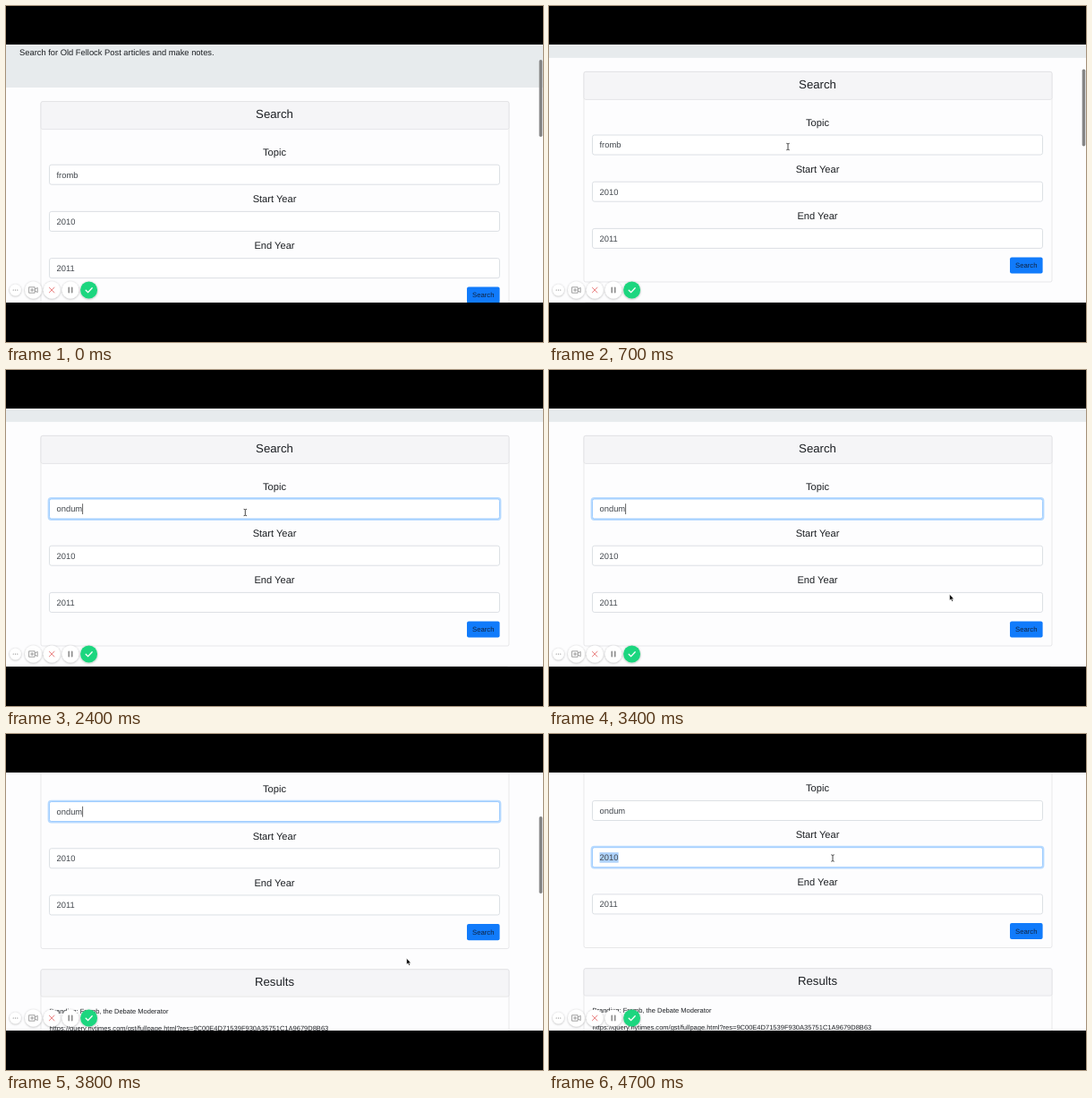
An HTML page that plays this animation: 600x375 px, repeating every 5.1 s.

```html
<!DOCTYPE html>
<html lang="en">
<head>
<meta charset="utf-8">
<title>Article search</title>
<style>
html, body { margin: 0; width: 100%; height: 100%; overflow: hidden; background: #000; }
svg { display: block; width: 100%; height: 100%; }
text { font-family: "Liberation Sans", Arial, sans-serif; fill: #1c1f23; text-rendering: geometricPrecision; white-space: pre; }
.mid { text-anchor: middle; }
</style>
</head>
<body>
<svg id="stage" viewBox="0 0 600 375">
  <defs>
    <clipPath id="view"><rect y="43" width="600" height="288"/></clipPath>
    <filter id="shadow" x="-40%" y="-40%" width="180%" height="180%">
      <feDropShadow dx="0" dy="0.5" stdDeviation="1" flood-color="#000" flood-opacity=".35"/>
    </filter>
  </defs>
  <rect width="600" height="375"/>
  <g clip-path="url(#view)">
    <rect y="43" width="600" height="288" fill="#fdfdfe"/>
    <g id="page"></g>
    <rect id="thumb" x="595.7" y="60" width="3.6" height="86" rx="1.8" fill="#858585"/>
    <g id="tools" fill="none" stroke-linecap="round"></g>
    <path id="beam" d="M-1.7-3.7Q0-3.7 0-2.7Q0-3.7 1.7-3.7M0-2.7V2.7M-1.7 3.7Q0 3.7 0 2.7Q0 3.7 1.7 3.7" fill="none" stroke="#333" stroke-width=".9"/>
    <path id="arrow" d="M0 0V6.6L1.5 5.3L2.6 7.8L3.7 7.3L2.6 4.9H4.6Z" fill="#000" stroke="#fff" stroke-width=".4"/>
  </g>
</svg>
<script>
const LOOP = 5100, STEP = 100;
const FIRST_STOP = 33.2, LAST_STOP = 102.7;
const OLD_TOPIC = "fromb", NEW_TOPIC = "ondum";
const $ = id => document.getElementById(id);
const page = $("page"), tools = $("tools");

function add(parent, tag, attrs, content = "") {
  const el = document.createElementNS("http://www.w3.org/2000/svg", tag);
  for (const key in attrs) el.setAttribute(key, attrs[key]);
  el.textContent = content;
  parent.append(el);
  return el;
}
const box = (x, y, width, height, attrs) => add(page, "rect", { x, y, width, height, ...attrs });
const label = (x, y, size, content, attrs) => add(page, "text", { x, y, "font-size": size, ...attrs }, content);
const show = (el, opacity) => el.setAttribute("opacity", Number(opacity));

function card(y, height, headHeight, title) {
  box(39, y, 523, height, { rx: 2, fill: "#fdfdfe", stroke: "#dfdfe1", "stroke-width": .7 });
  box(39, y, 523, headHeight, { rx: 2, fill: "#f5f5f7", stroke: "#dfdfe1", "stroke-width": .7 });
  label(300, y + 18.4, 13.2, title, { class: "mid" });
}

function field(index, name) {
  const y = 177.2 + index * 52.2;
  label(300, y - 10.2, 11.1, name, { class: "mid" });
  const ring = box(47.6, y - .9, 504.8, 23.8, { rx: 3, fill: "none", stroke: "#b9dbff", "stroke-width": 2 });
  const frame = box(48.5, y, 503, 22, { rx: 2.3, fill: "#fff", "stroke-width": .8 });
  const mark = box(56.5, y + 5.4, 0, 11.6, { fill: "#aed2fb" });
  const text = label(56.5, y + 14.4, 9.4, "", { style: "fill:#43484e" });
  const caret = box(0, y + 5.2, .7, 11.8, { fill: "#222" });
  return (value, focus, selected, caretOn) => {
    text.textContent = value;
    const width = value ? text.getComputedTextLength() : 0;
    mark.setAttribute("width", selected ? width + .3 : 0);
    caret.setAttribute("x", 56.7 + width);
    frame.setAttribute("stroke", focus ? "#8cc3ff" : "#d3d8dd");
    show(ring, focus);
    show(caret, caretOn);
  };
}

box(0, -20, 600, 111, { fill: "#e7ebed" });
label(15, 54.5, 9.35, "Search for Old Fellock Post articles and make notes.");
card(106.6, 234.6, 31, "Search");
const topic = field(0, "Topic");
const startYear = field(1, "Start Year");
const endYear = field(2, "End Year");
box(515, 313.6, 36.6, 18.2, { rx: 2, fill: "#117bfb" });
label(533.3, 325.3, 7.7, "Search", { class: "mid", style: "fill:#10233f" });
card(364.4, 200, 30.4, "Results");
label(48.5, 413.3, 7.5, "Branding: Fromb, the Debate Moderator");
label(48.5, 432.3, 7.53, "https://query.nytimes.com/gst/fullpage.html?res=9C00E4D71539F930A35751C1A9679D8B63");

function tool(cx, r, fill, d, stroke, width) {
  add(tools, "circle", { cx, cy: 317, r, fill, filter: "url(#shadow)" });
  add(tools, "path", { d, transform: `translate(${cx} 317)`, stroke, "stroke-width": width });
}
tool(10.5, 6.3, "#fff", "M-2.3 0h.01M0 0h.01M2.3 0h.01", "#777", 1.2);
tool(30.5, 9.4, "#fff", "M-4.5-3.2H1.7V3.2H-4.5ZM1.7-.8L4.7-2.6V2.6L1.7.8M-2.9 0H.2M-1.4-1.5V1.5", "#888", .8);
tool(51.2, 9.4, "#fff", "M-2.8-2.8L2.8 2.8M2.8-2.8L-2.8 2.8", "#e87878", 1);
tool(72, 9.4, "#fff", "M-1.8-2.8V2.8M1.8-2.8V2.8", "#777", 1.3);
tool(92.6, 9.5, "#1fd67f", "M-3.4.2L-1 2.6L3.6-2.3", "#fff", 1.3);

const clamp = v => Math.max(0, Math.min(1, v));
const span = (t, from, to) => clamp((t - from) / (to - from));
const easeOut = p => 1 - (1 - p) ** 2.6;
const within = (t, from, to) => t >= from && t < to;

// Linear interpolation through [time, x, y] stops.
const cursorPath = [[600, 267, 157], [800, 267, 157], [1000, 267.3, 159], [2800, 267.3, 159],
  [3200, 447.7, 250.5], [3900, 447.7, 250.5], [4100, 345, 160], [4200, 345, 160], [4300, 317, 138.5]];
function cursorAt(t) {
  const next = cursorPath.findIndex(stop => stop[0] > t);
  if (next < 1) return cursorPath[next < 0 ? cursorPath.length - 1 : 0].slice(1);
  const [a, b] = [cursorPath[next - 1], cursorPath[next]];
  const p = span(t, a[0], b[0]);
  return [a[1] + (b[1] - a[1]) * p, a[2] + (b[2] - a[2]) * p];
}

function draw(t) {
  const scroll = FIRST_STOP * easeOut(span(t, 0, 600))
    + (LAST_STOP - FIRST_STOP) * easeOut(span(t, 3400, 3900));
  page.setAttribute("transform", `translate(0 ${-scroll})`);
  $("thumb").setAttribute("y", 60 + scroll * .315);
  show($("thumb"), t < 3500 ? 1 - span(t, 800, 1100) : 1 - span(t, 4400, 4700));

  const typed = NEW_TOPIC.slice(0, Math.max(0, (t - 1900) / STEP));
  const caretOn = within(t, 1000, 1600) || within(t, 1900, 2900) || within(t, 3400, 3900);
  const moved = span(t, 4300, 4500);
  topic(t < 1900 ? OLD_TOPIC : typed, span(t, 900, 1100) * (1 - moved), within(t, 1600, 1900), caretOn);
  startYear("2010", moved, t >= 4600, false);
  endYear("2011", 0, false, false);

  const [x, y] = cursorAt(t);
  const pointing = within(t, 2900, 4300);
  for (const id of ["beam", "arrow"]) {
    $(id).setAttribute("transform", `translate(${x} ${y})`);
    show($(id), t >= 600 && pointing === (id === "arrow"));
  }
}

const begin = performance.now();
function tick() {
  const t = (performance.now() - begin) % LOOP;
  draw(Math.floor(t / STEP) * STEP);
  requestAnimationFrame(tick);
}
tick();
</script>
</body>
</html>
```
